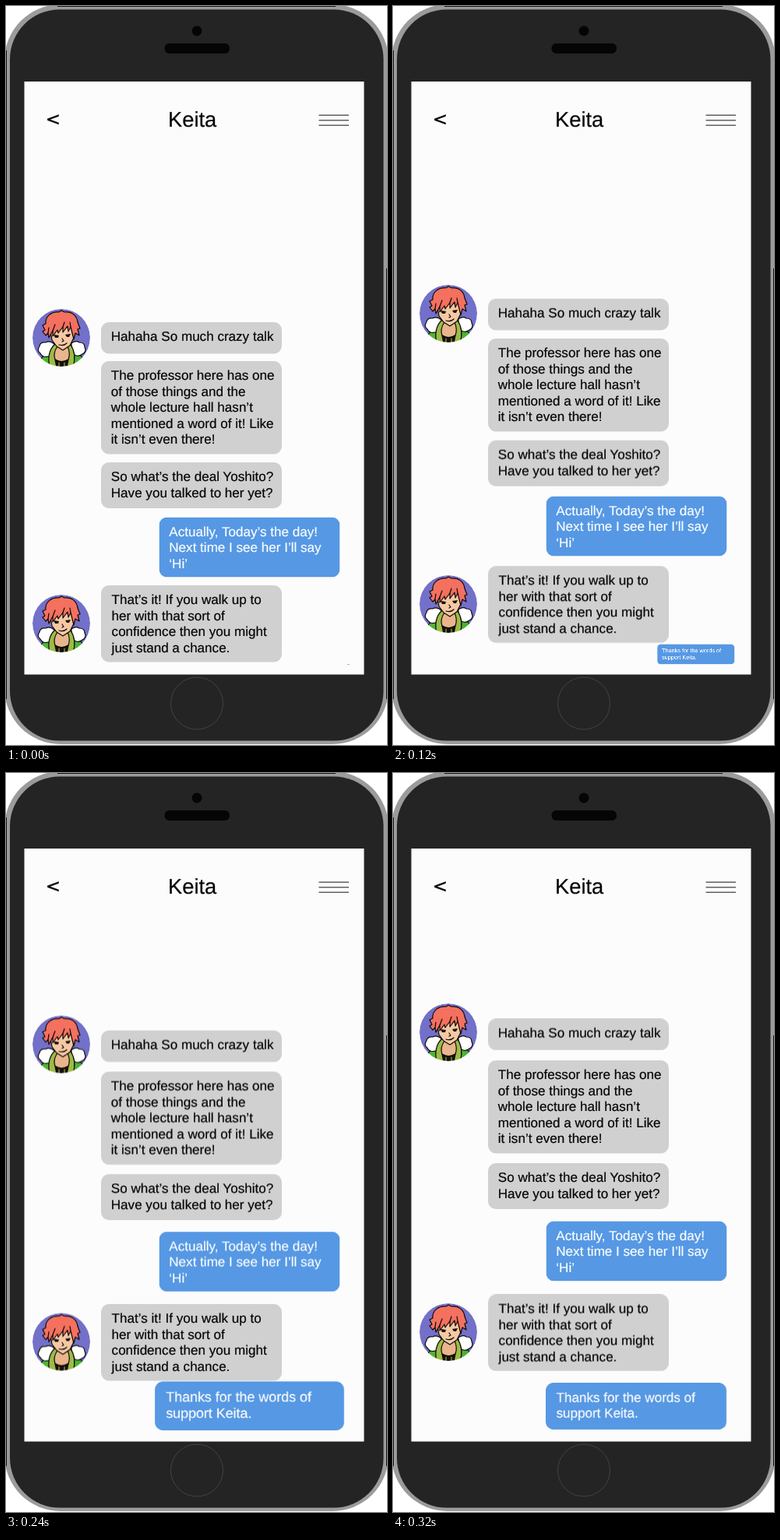
Write an HTML page that moves like this. It is 489 px wide and 949 px high and loops after 640 ms.

```html
<!DOCTYPE html>
<html lang="en">
<head>
<meta charset="utf-8">
<title>Chat message pop</title>
<style>
  html, body { margin: 0; width: 100%; height: 100%; overflow: hidden; background: #fff; }
  svg { display: block; width: 489px; height: 949px; }
  text {
    font: 17.07px "Liberation Sans", Arial, sans-serif;
    text-rendering: geometricPrecision;
    fill: currentColor; stroke: currentColor; stroke-width: .2;
  }
  .title { font-size: 27.3px; }
  .back { font: 23px "DejaVu Sans", sans-serif; stroke-width: .4; }
  .ink { fill: none; stroke: #0c0806; stroke-width: 1.2; stroke-linecap: round; stroke-linejoin: round; }
  .shape { stroke: #0c0806; stroke-width: 1.2; stroke-linejoin: round; }
</style>
</head>
<body>
<svg id="stage" viewBox="0 0 489 949" color="#050505">
  <defs>
    <clipPath id="disc"><circle r="37"/></clipPath>
    <linearGradient id="coat">
      <stop offset="0" stop-color="#2fb52c"/>
      <stop offset=".5" stop-color="#7fb840"/>
      <stop offset="1" stop-color="#27ae2b"/>
    </linearGradient>
    <g id="avatar" clip-path="url(#disc)">
      <circle r="37" fill="#7270c8"/>
      <path class="shape" fill="url(#coat)" d="M-32 40Q-30 25-14 19H15Q31 22 34 40Z"/>
      <path class="shape" fill="#fff" d="M-9 8Q-15 3-20 6Q-27 5-28 11Q-32 16-27 20Q-24 26-17 24Q-11 26-10 19Z"/>
      <path class="shape" fill="#fff" d="M13 7Q19 3 23 6Q30 6 30 12Q33 18 27 21Q22 25 17 22Q12 20 13 14Z"/>
      <path class="shape" fill="#9cbb47" d="M-9 9Q-19 19-15 38H15Q20 21 12 9Z"/>
      <path class="shape" fill="#e9b58d" d="M-5 11Q-11 20-8 28Q0 34 9 28Q12 20 8 11Z"/>
      <path class="shape" fill="#15130f" d="M-8 28Q0 33 9 28L7 38H-6Z"/>
      <path class="ink" d="M-3 32V38M4 32V38" style="stroke:#a8a33a"/>
      <path class="shape" fill="#f5c8a3" d="M-14-9L-12 3L-6 11L2 16L11 10L16 0V-13H-14Z"/>
      <path class="ink" d="M1 1L3 4L1 5M-3 9Q3 11 7 7"/>
      <path d="M-10-4L-3-3L-4 0H-8ZM5-4L12-5L10-1H7Z" fill="#17100d"/>
      <path class="shape" fill="#f4705f" d="M-20-3L-24-8L-21-10L-24-16L-20-18C-21-28-12-34-3-33L0-35L4-33C14-34 20-28 21-20L24-12L21-11L23-3L18-6L16 2L14-6L12-14L9-8L8-15L2-7V-14L-4-6L-5-10L-11-2V-9L-16 0L-17-6Z"/>
      <path class="ink" d="M-11-9L-8-17M2-14L4-20M12-14L11-20M-17-6L-16-13"/>
    </g>
  </defs>

  <rect x="-2" y="-2" width="493" height="950" rx="72" fill="#9b9b9b"/>
  <path d="M66 .5H423M.5 57V890M488.500 337V890" stroke="#111"/>
  <rect x="5" y="4.500" width="479.500" height="939" rx="64" fill="#242424"/>
  <circle cx="245" cy="32" r="6.500" fill="#050505"/>
  <rect x="203.500" y="48" width="83.500" height="13" rx="6" fill="#050505"/>
  <circle cx="245" cy="895.500" r="33.500" fill="none" stroke="#434343"/>
  <rect x="23.500" y="97" width="436" height="761.500" fill="#fcfcfc"/>
  <text class="back" x="50.800" y="152.600">&lt;</text>
  <text class="title" x="208" y="154.700">Keita</text>
  <path d="M401.500 140.300H440M401.500 146.800H440M401.500 153.300H440" stroke="#606060" stroke-width="1.500"/>
</svg>

<script>
const LOOP = 640;
const TIMES = [0, 80, 120, 160, 200, 240, 280, 320];
const RISE_STEPS = 6;
const LINE_HEIGHT = 20.5;
const stage = document.getElementById('stage');

const GREY = { fill: '#d0d0d0', ink: '#050505' };
const BLUE = { fill: '#5698e4', ink: '#fafcff' };

// startY and endY are the bubble tops before and after the new message arrives.
const BUBBLES = [
  { x: 122, w: 232, h: 40.5, startY: 406, endY: 315.5, look: GREY,
    lines: ['Hahaha So much crazy talk'] },
  { x: 122, w: 232, h: 119.5, startY: 456, endY: 369, look: GREY,
    lines: ['The professor here has one', 'of those things and the', 'whole lecture hall hasn’t',
      'mentioned a word of it! Like', 'it isn’t even there!'] },
  { x: 122, w: 232, h: 59, startY: 586, endY: 501, look: GREY,
    lines: ['So what’s the deal Yoshito?', 'Have you talked to her yet?'] },
  { x: 196.5, w: 232, h: 77, startY: 656.5, endY: 575.5, look: BLUE,
    lines: ['Actually, Today’s the day!', 'Next time I see her I’ll say', '‘Hi’'] },
  { x: 122, w: 232, h: 98.5, startY: 744, endY: 669.5, look: GREY, indent: 13.6,
    lines: ['That’s it! If you walk up to', 'her with that sort of',
      'confidence then you might', 'just stand a chance.'] }
];

const AVATARS = [
  { startY: 426, endY: 333 },
  { startY: 793, endY: 718 }
];

function add(parent, tag, attrs = {}, content = '') {
  const node = document.createElementNS('http://www.w3.org/2000/svg', tag);
  for (const [name, value] of Object.entries(attrs)) node.setAttribute(name, value);
  node.textContent = content;
  return parent.appendChild(node);
}

function addBubble({ w, h, look, lines, indent = 12.8 }, left = 0, top = 0) {
  const group = add(stage, 'g', { color: look.ink });
  add(group, 'rect', { x: left, y: top, width: w, height: h, rx: 10, fill: look.fill });
  lines.forEach((line, i) => add(group, 'text', {
    x: left + indent, y: top + 24.4 + i * LINE_HEIGHT
  }, line));
  return group;
}

function play(node, transformAt) {
  const frames = TIMES.map((time, step) => ({
    offset: time / LOOP, transform: transformAt(step), easing: 'step-end'
  }));
  frames.push({ offset: 1, transform: transformAt(TIMES.length - 1) });
  node.animate(frames, { duration: LOOP, iterations: Infinity });
}

function rise(node, x, { startY, endY }) {
  play(node, step => {
    const progress = Math.min(step / RISE_STEPS, 1);
    return `translate(${x}px, ${startY + (endY - startY) * progress}px)`;
  });
}

for (const bubble of BUBBLES) rise(addBubble(bubble), bubble.x, bubble);
for (const avatar of AVATARS) rise(add(stage, 'use', { href: '#avatar' }), 71, avatar);

// The reply grows from its bottom right corner to 125 %, then snaps to full size.
const reply = addBubble({ w: 232, h: 60, look: BLUE, indent: 13.5,
  lines: ['Thanks for the words of', 'support Keita.'] }, -232, -60);
play(reply, step => step > RISE_STEPS
  ? 'translate(428px, 843px) scale(1)'
  : `translate(${441 - 1.42 * step}px, ${846 - 0.37 * step}px) scale(${0.0125 + 0.2068 * step})`);
</script>
</body>
</html>
```
